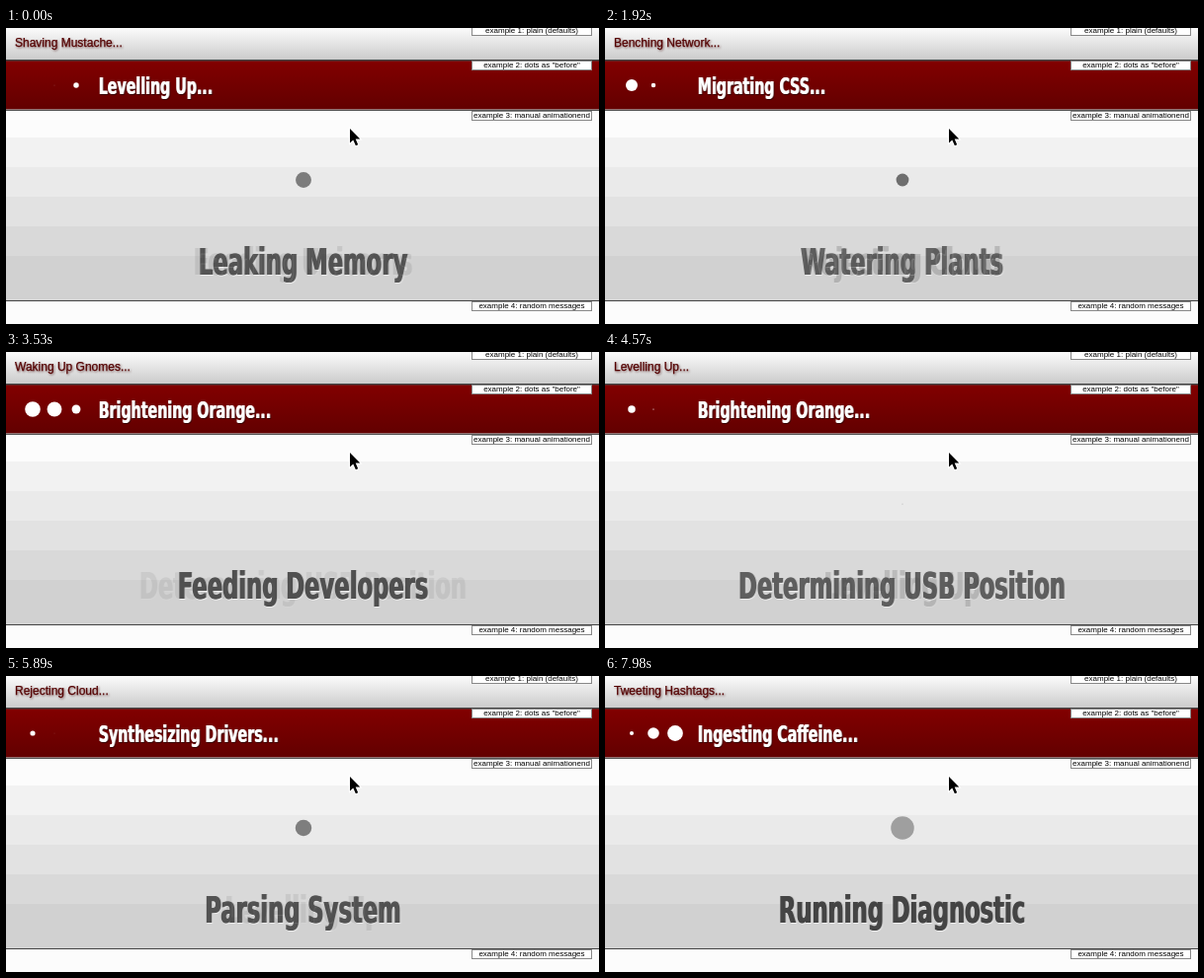
An HTML page that plays this animation: 600x300 px, repeating every 8 s.

```html
<!DOCTYPE html>
<html lang="en">
<head>
<meta charset="utf-8">
<title>Loading messages</title>
<style>
  html, body { margin: 0; width: 100%; height: 100%; overflow: hidden; background: #fcfcfc; }
  svg { display: block; font-family: "Liberation Sans", Arial, sans-serif; }
  .plain { font-size: 12px; fill: #500; stroke: #500; stroke-width: .25px; filter: drop-shadow(1px 1px 1px rgba(60, 0, 0, .55)); }
  /* The sideways shadow thickens the upright stems. */
  .heavy { font-family: "DejaVu Sans", sans-serif; font-weight: bold; }
  .banner { font-size: 23.5px; fill: #fff; filter: drop-shadow(1px 0 0 #fff) drop-shadow(1px 1px 0 #300); }
  .big { font-size: 37px; fill: #444; text-anchor: middle; filter: drop-shadow(2px 0 0 #444) drop-shadow(1px 1px 0 #f2f2f2); }
  .label rect { fill: #fff; stroke: #888; }
  .label text { font-size: 8px; fill: #000; text-anchor: middle; }
</style>
</head>
<body>
<svg width="600" height="300" viewBox="0 0 600 300">
  <defs>
    <linearGradient id="silver" x2="0" y2="1"><stop stop-color="#fbfbfb"/><stop offset="1" stop-color="#cbcbcb"/></linearGradient>
    <linearGradient id="red" x2="0" y2="1"><stop stop-color="#820000"/><stop offset="1" stop-color="#620000"/></linearGradient>
  </defs>
  <rect width="600" height="32" fill="url(#silver)"/>
  <rect y="32" width="600" height="1" fill="#444"/>
  <rect y="33" width="600" height="50" fill="url(#red)"/>
  <rect y="33" width="600" height="1" fill="#622"/>
  <rect y="82" width="600" height="1" fill="#977"/>
  <rect y="83" width="600" height="1" fill="#555"/>
  <g id="steps"></g>
  <rect y="276" width="600" height="1" fill="#444"/>
  <g id="labels"></g>

  <text id="plain" class="plain" x="9" y="19"></text>
  <g id="dots" fill="#fff"></g>
  <text id="banner" class="heavy banner" transform="translate(93.500 66.500) scale(.605 1)"></text>
  <circle id="pulse" cx="301" cy="154" fill="#333"/>
  <text id="entering" class="heavy big" transform="translate(300 250) scale(.613 1)"></text>
  <text id="leaving" class="heavy big" transform="translate(300 250) scale(.613 1)"></text>
  <path d="M348 102v14.500l3.300-3.100 2.600 5.800 2.300-1-2.500-5.700h4.600z" fill="#000" stroke="#fff" stroke-width="2" paint-order="stroke"/>
</svg>
<script>
const LOOP = 8000;
const TICK = 147.8;      // the picture advances in held steps
const SPEED = 1 / .984;

const plainMessages = ['Shaving Mustache', 'Drawing Icons', 'Benching Network', 'Waking Up Gnomes',
  'Levelling Up', 'Rejecting Cloud', 'Running Diagnostic', 'Tweeting Hashtags'];
const bannerMessages = ['Levelling Up', 'Parsing System', 'Migrating CSS', 'Brightening Orange',
  'Synthesizing Drivers', 'Growing Beard', 'Ingesting Caffeine'];
const bigMessages = ['Feeding Unicorns', 'Leaking Memory', 'Rejecting Cloud', 'Watering Plants',
  'Feeding Developers', 'Determining USB Position', 'Levelling Up', 'Parsing System',
  'Drawing Icons', 'Running Diagnostic'];

const byId = id => document.getElementById(id);

function add(parent, tag, attributes, text = '') {
  const node = document.createElementNS('http://www.w3.org/2000/svg', tag);
  for (const name in attributes) node.setAttribute(name, attributes[name]);
  node.textContent = text;
  parent.append(node);
  return node;
}

[[84, 27, 252], [111, 30, 242], [141, 30, 234], [171, 30, 226], [201, 30, 217], [231, 45, 209]]
  .forEach(([y, height, gray]) =>
    add(byId('steps'), 'rect', { y, height, width: 600, fill: `rgb(${gray},${gray},${gray})` }));

[[-2, 'plain (defaults)'], [33, 'dots as "before"'], [84, 'manual animationend'], [277, 'random messages']]
  .forEach(([y, name], i) => {
    const label = add(byId('labels'), 'g', { class: 'label' });
    add(label, 'rect', { x: 471.5, y: y + .5, width: 121, height: 9 });
    add(label, 'text', { x: 532, y: y + 7 }, `example ${i + 1}: ${name}`);
  });

const dots = [27, 49, 71].map(cx => add(byId('dots'), 'circle', { cx, cy: 58, r: 0 }));

// cubic-bezier(.42, 0, .58, 1)
function easeInOut(x) {
  let low = 0, high = 1;
  for (let i = 0; i < 20; i++) {
    const s = (low + high) / 2;
    const at = 1.26 * s * (1 - s) ** 2 + 1.74 * s * s * (1 - s) + s ** 3;
    if (at < x) low = s; else high = s;
  }
  return low * low * (3 - 2 * low);
}

// Grows over 40% of the cycle, shrinks over the next 40%, then rests.
function bounce(seconds) {
  const phase = (seconds + 1.4) % 1.4 / .56;
  return phase < 2 ? easeInOut(1 - Math.abs(phase - 1)) : 0;
}

function showMessage(id, messages, seconds, first, interval) {
  const index = Math.max(0, Math.floor((seconds - first) / interval) + 1);
  byId(id).textContent = messages[Math.min(index, messages.length - 1)] + '...';
}

function draw(time) {
  const seconds = time / 1000 * SPEED;
  showMessage('plain', plainMessages, seconds, .5, 1.2);
  showMessage('banner', bannerMessages, seconds, .405, 1.5);

  dots.forEach((dot, i) => dot.setAttribute('r', 8 * bounce(seconds + 1.213 - .16 * i)));

  const cycle = Math.floor(seconds + .44);
  const phase = seconds + .44 - cycle;
  const growth = easeInOut(phase);
  byId('pulse').setAttribute('r', 20 * growth);
  byId('pulse').setAttribute('opacity', 1 - growth);

  const fade = Math.min(1, phase * 2);
  byId('leaving').textContent = bigMessages[cycle];
  byId('leaving').style.opacity = 1 - fade;
  byId('entering').textContent = bigMessages[cycle + 1];
  byId('entering').style.opacity = fade;
}

const start = performance.now();
function frame() {
  const time = (performance.now() - start) % LOOP;
  draw(Math.floor((time + 30) / TICK) * TICK);
  requestAnimationFrame(frame);
}
frame();
</script>
</body>
</html>
```
